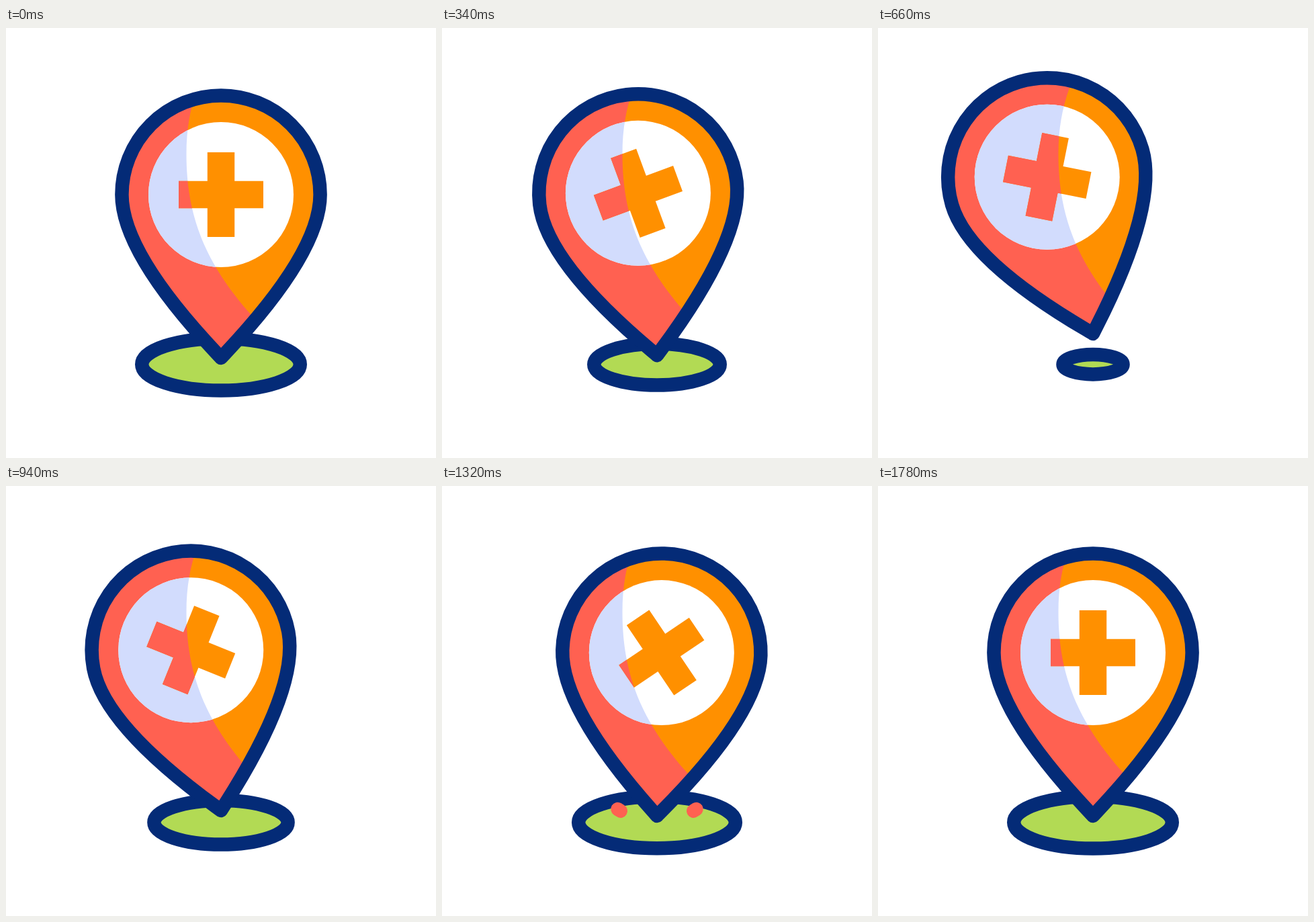
Animation, 640 px wide and 640 px high, one loop 2.42 s. Source, as an HTML page with a canvas:

```html
<!DOCTYPE html>
<html lang="en">
<head>
<meta charset="utf-8">
<title>Clinic map pin</title>
<style>
  html, body { margin: 0; width: 100%; height: 100%; overflow: hidden; background: #fff; }
  canvas { display: block; width: 100vw; height: 100vh; }
</style>
</head>
<body>
<canvas id="stage"></canvas>
<script>
const LOOP = 2420, STEP = 20, SIZE = 640;
const NAVY = '#042b77', GREEN = '#b2da54', RED = '#ff6151', ORANGE = '#ff9000';
const WHITE = '#ffffff', LAVENDER = '#d2dcfd';
const LINE = 20.5, RADIUS = 147.6, HEIGHT = 243, GROUND = 491;

// Tracks: [time in ms, value]
const lift = [[0, 0], [340, 3.8], [540, 19], [660, 36], [720, 38.5], [940, 8], [1080, 0]];
const lean = [[0, 0], [840, -18.5], [1090, 3.9], [1200, -3.5], [1330, 1.7], [1460, -0.8], [1600, 0]];
const spin = [[0, 0], [340, -20.2], [660, -78.7], [940, -158], [1080, -231.2], [1320, -304], [1780, -360]];
const spread = [[90, 1], [772, 0.33], [1080, 1.238], [1320, 0.992], [1560, 1]];
const sparkHead = [[980, 0], [1220, 1]];
const sparkTail = [[1080, 0], [1400, 1]];

// Slope at key i: flat at ends and turning points, harmonic mean elsewhere
function slope(keys, i) {
  if (i === 0 || i === keys.length - 1) return 0;
  const rate = k => (keys[k + 1][1] - keys[k][1]) / (keys[k + 1][0] - keys[k][0]);
  const a = rate(i - 1), b = rate(i);
  return a * b <= 0 ? 0 : 2 * a * b / (a + b);
}

function at(keys, t) {
  const last = keys.length - 1;
  if (t <= keys[0][0]) return keys[0][1];
  if (t >= keys[last][0]) return keys[last][1];
  const i = keys.findIndex(k => k[0] > t) - 1;
  const [t0, v0] = keys[i], [t1, v1] = keys[i + 1];
  const d = t1 - t0, u = (t - t0) / d, w = 1 - u;
  return v0 * w * w * (1 + 2 * u) + v1 * u * u * (3 - 2 * u)
    + d * u * w * (slope(keys, i) * w - slope(keys, i + 1) * u);
}

// Pin outline with its tip at the origin
const bend = HEIGHT - 95;
const pin = new Path2D(`M0 0C-15 -17 ${-RADIUS} ${-bend} ${-RADIUS} ${-HEIGHT}
  A${RADIUS} ${RADIUS} 0 0 1 ${RADIUS} ${-HEIGHT}C${RADIUS} ${-bend} 15 -17 0 0Z`);

const disc = new Path2D();
disc.arc(0, 0, 108, 0, 2 * Math.PI);

const cross = new Path2D();
cross.rect(-63, -20.2, 126, 40.4);
cross.rect(-20.2, -63, 40.4, 126);

// The shaded side stays still while the pin swings through it
const shade = new Path2D(`M0 0H318L285 89C274 120 268.5 150 268.5 188
  C268.5 280 297 351 366 428L420 490V640H0Z`);

const canvas = document.getElementById('stage');
const ctx = canvas.getContext('2d');
const scale = Math.max(1, window.devicePixelRatio || 1);
canvas.width = canvas.height = SIZE * scale;

function place(x, y, angle, draw) {
  ctx.save();
  ctx.translate(x, y);
  ctx.rotate(angle);
  draw();
  ctx.restore();
}

function fill(path, x, y, angle, color) {
  ctx.fillStyle = color;
  place(x, y, angle, () => ctx.fill(path));
}

function twoTone(path, x, y, angle, lit, dark) {
  fill(path, x, y, angle, lit);
  ctx.save();
  ctx.clip(shade);
  fill(path, x, y, angle, dark);
  ctx.restore();
}

function paintSparks(head, tail) {
  if (head <= 0 || tail >= 1) return;
  ctx.strokeStyle = RED;
  for (const side of [-1, 1]) {
    const point = p => [320 + side * (31 + 27.5 * p), 498 - 17 * p];
    ctx.beginPath();
    ctx.moveTo(...point(tail));
    ctx.lineTo(...point(head));
    ctx.stroke();
  }
}

function paint(t) {
  const tip = GROUND - at(lift, t);
  const tilt = at(lean, t) * Math.PI / 180;
  const turn = at(spin, t) * Math.PI / 180;
  const size = at(spread, t);
  const x = 320 + HEIGHT * Math.sin(tilt), y = tip - HEIGHT * Math.cos(tilt);

  ctx.setTransform(scale, 0, 0, scale, 0, 0);
  ctx.fillStyle = WHITE;
  ctx.fillRect(0, 0, SIZE, SIZE);
  ctx.lineWidth = LINE;
  ctx.lineJoin = ctx.lineCap = 'round';

  ctx.beginPath();
  ctx.ellipse(320, 500.7, 117.75 * size, 38.8 * size, 0, 0, 2 * Math.PI);
  ctx.fillStyle = GREEN;
  ctx.strokeStyle = NAVY;
  ctx.fill();
  ctx.stroke();

  twoTone(pin, 320, tip, tilt, ORANGE, RED);
  twoTone(disc, x, y, 0, WHITE, LAVENDER);
  twoTone(cross, x, y, turn, ORANGE, RED);
  place(320, tip, tilt, () => ctx.stroke(pin));

  paintSparks(at(sparkHead, t), at(sparkTail, t));
}

const start = performance.now();
function tick() {
  const t = (performance.now() - start) % LOOP;
  paint(Math.floor(t / STEP) * STEP);
  requestAnimationFrame(tick);
}
tick();
</script>
</body>
</html>
```
